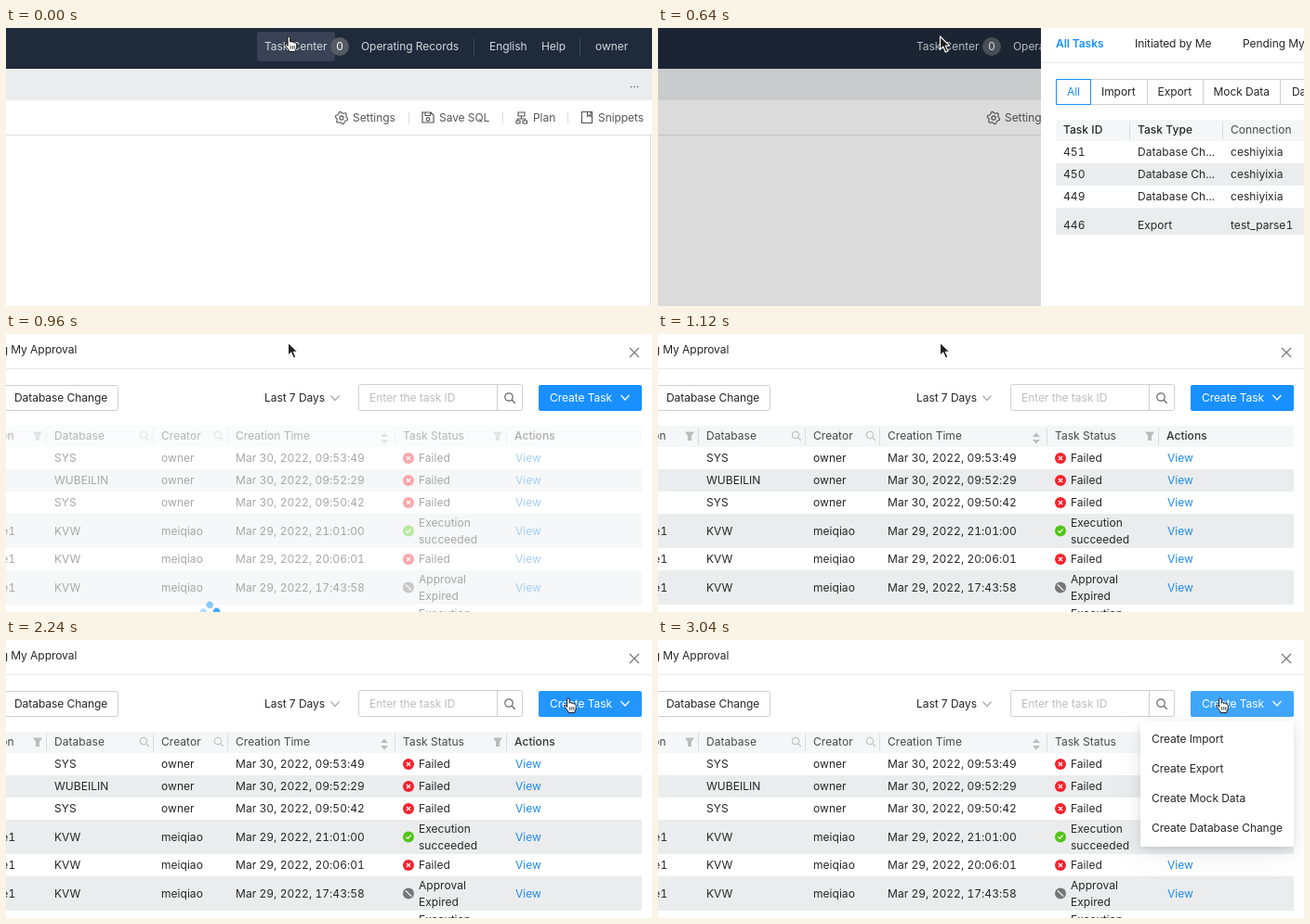
Animation, 695 px wide and 300 px high, one loop 3.2 s. Source, as an HTML page:

```html
<!DOCTYPE html>
<html lang="en">
<head>
<meta charset="utf-8">
<title>Task center</title>
<style>
html, body { margin: 0; width: 100%; height: 100%; overflow: hidden; background: #fff }
svg { display: block; font: 12px Inter, "Noto Sans", sans-serif; letter-spacing: -.06px; white-space: pre }
#table { font-variant-numeric: tabular-nums; letter-spacing: .04px }
#menu rect { filter: drop-shadow(0 2px 3px #0001) drop-shadow(0 5px 8px #0001) drop-shadow(0 8px 16px #0000000d) }
</style>
</head>
<body>
<svg id="stage" width="695" height="300" viewBox="0 0 695 300">
  <defs><clipPath id="cut"><rect id="cutBox" width="1000" height="300"/></clipPath></defs>
  <g id="page"></g>
  <rect id="mask" width="695" height="300" opacity=".14"/>
  <g id="drawer">
    <rect width="1000" height="300" fill="#fff"/>
    <g id="bar"></g>
    <g clip-path="url(#cut)"><g id="table"></g></g>
    <g id="spin" fill="#1890ff"></g>
  </g>
  <g id="menu"></g>
  <path id="arrow" d="M0 0V14.2L3.3 11.2L5.8 17L8.4 15.9L5.9 10.2H10.2Z" fill="#222" stroke="#fff" stroke-width="1.1" stroke-linejoin="round"/>
  <g id="hand" stroke="#111" stroke-linejoin="round" stroke-linecap="round">
    <path d="M3.6 10V2.2C3.6 .2 6.2 .2 6.2 2.2V6.2C6.6 5 8.5 5.2 8.6 6.5C9.2 5.6 10.8 6 10.9 7.2C11.6 6.6 13.2 7 13.2 8.4V11.5C13.2 13.5 12 14 11.8 16.4H5.2C4.9 14 2.3 12.4 1 9.8C.2 8.2 1.8 7.2 2.8 8.8Z" fill="#fff"/>
    <path d="M6.7 10.5V13.3M8.8 10.5V13.3M10.8 10.5V13.3" stroke-width=".8"/>
  </g>
</svg>
<script>
const $ = id => document.getElementById(id);
const text = (x, y, s, fill = '#262626', more = '') =>
  `<text x="${x}" y="${y + 4.3}" fill="${fill}" ${more}>${s}</text>`;
const rect = (x, y, w, h, fill, more = '') =>
  `<rect x="${x}" y="${y}" width="${w}" height="${h}" fill="${fill}" ${more}/>`;
const line = (d, color, width = 1, more = '') =>
  `<path d="${d}" fill="none" stroke="${color}" stroke-width="${width}" ${more}/>`;
const dot = (x, y, r, fill) => `<circle cx="${x}" cy="${y}" r="${r}" fill="${fill}"/>`;
const lens = (x, y, r, color) =>
  line(`M${x - r} ${y}a${r} ${r} 0 1 1 ${2 * r} 0a${r} ${r} 0 1 1 ${-2 * r} 0M${x + r * .7} ${y + r * .7}l${r * .9} ${r * .9}`, color, r / 3.4);
const chevron = (x, y, color) => line(`M${x - 4.5} ${y - 2.5}l4.5 5l4.5 -5`, color, 1.2);
const bold = 'font-weight="500"';

function drawPage() {
  const pale = '#d5d8dd', ink = '#555';
  let s = rect(0, 0, 695, 44, '#1f2a3b') + rect(0, 44, 695, 34, '#ebecee');
  s += rect(270, 4, 84, 32, '#3a4256', 'rx="3" id="hover"') + dot(359, 20, 10, '#565b64');
  for (const [x, label] of [[278, 'Task Center'], [382, 'Operating Records'], [520, 'English'], [576, 'Help'], [634, 'owner']])
    s += text(x, 20, label, pale);
  s += text(355.3, 20, '0', '#fff');
  s += line('M503.5 11V30M617.5 11V30', '#3c4657');
  for (const x of [672.5, 676, 679.5]) s += dot(x, 63.5, .8, '#666');
  for (const [x, label] of [[373, 'Settings'], [466, 'Save SQL'], [567, 'Plan'], [637, 'Snippets']])
    s += text(x, 97, label, ink);
  s += line('M433.5 91V103M534.5 91V103M604.5 91V103', '#ddd');
  s += line('M0 115.5H695M693.5 116V300', '#dedede');
  // gear
  let gear = '';
  for (let i = 0; i < 24; i++) {
    const a = (i + .5) * Math.PI / 12, r = i % 4 < 2 ? 6.7 : 5.2;
    gear += `${i ? 'L' : 'M'}${361 + r * Math.cos(a)} ${97 + r * Math.sin(a)}`;
  }
  s += line(gear + 'ZM358.9 97a2.1 2.1 0 1 0 4.2 0a2.1 2.1 0 1 0 -4.2 0', ink, 1.1, 'stroke-linejoin="round"');
  s += line('M448 91H457L460 94V102H448ZM451 91V94.5H456.5V91M452.2 98.5a1.8 1.8 0 1 0 3.6 0a1.8 1.8 0 1 0 -3.6 0', ink, 1.2);
  s += line('M551 91H558V95H551ZM554.5 95V98M550.5 100V98H558.5V100M549 100H553V103H549ZM556 100H560.5V103H556Z', ink, 1.1);
  s += line('M619.5 90.5H630.5V102.5H619.5ZM625.5 90.5V95.5L627.5 94L629 95.5V90.5', ink, 1.1);
  return s;
}

function drawBar() {
  const edge = '#cfcfcf';
  let s = text(16, 17, 'All Tasks', '#1890ff', 'font-weight="600"') + text(101, 17, 'Initiated by Me') +
    text(217, 17, 'Pending My Approval') + line('M0 37.5H1000', '#e8e8e8');
  s += rect(16.5, 55.5, 365, 27, '#fff', `stroke="${edge}" rx="2"`);
  s += line('M114.5 55V83M174.5 55V83M257.5 55V83', edge);
  s += rect(16.5, 55.5, 37, 27, '#fff', 'stroke="#1890ff"');
  s += text(28, 69, 'All', '#1890ff');
  for (const [x, label] of [[65, 'Import'], [125.5, 'Export'], [185.5, 'Mock Data'], [270, 'Database Change'], [539, 'Last 7 Days']])
    s += text(x, 69, label);
  s += chevron(615, 69, '#aaa');
  s += rect(640.5, 54.5, 176, 28, '#fff', `stroke="${edge}" rx="2"`) + line('M789.5 55V82', edge);
  s += text(652, 69, 'Enter the task ID', '#bdbdbd') + lens(802, 68, 4.2, '#666');
  s += rect(830, 51, 119, 36, '#1890ff', 'rx="5" opacity=".13" id="wave"');
  s += rect(834, 55, 111, 28, '#1890ff', 'rx="2" id="button"');
  s += text(846, 69, 'Create Task', '#fff') + chevron(927, 68.5, '#fff');
  return s + line('M932 15l10 10M942 15l-10 10', '#777', 1.2);
}

const status = {
  Failed: ['#f5222d', 'M-2 -2L2 2M2 -2L-2 2'],
  'Execution succeeded': ['#52c41a', 'M-2.5 0L-.7 1.9L2.6 -1.8'],
  'Approval Expired': ['#777', 'M-3.2 -3.2L3.2 3.2']
};
const rows = [
  [122, 24, 451, 'Database Ch...', 'ceshiyixia', 'SYS', 'owner', '30, 2022, 09:53:49', 'Failed'],
  [146, 24, 450, 'Database Ch...', 'ceshiyixia', 'WUBEILIN', 'owner', '30, 2022, 09:52:29', 'Failed'],
  [170, 24, 449, 'Database Ch...', 'ceshiyixia', 'SYS', 'owner', '30, 2022, 09:50:42', 'Failed'],
  [194, 37, 446, 'Export', 'test_parse1', 'KVW', 'meiqiao', '29, 2022, 21:01:00', 'Execution succeeded'],
  [231, 24, 445, 'Export', 'test_parse1', 'KVW', 'meiqiao', '29, 2022, 20:06:01', 'Failed'],
  [255, 37, 444, 'Export', 'test_parse1', 'KVW', 'meiqiao', '29, 2022, 17:43:58', 'Approval Expired'],
  [292, 37, 443, 'Export', 'test_parse1', 'KVW', 'meiqiao', '29, 2022, 17:40:12', 'Execution succeeded']
];

function drawTable() {
  const columns = [24, 104, 204, 313, 428, 508];
  const grey = '#bcbcbc';
  let s = rect(16, 99, 929, 23, '#f5f6f8');
  ['Task ID', 'Task Type', 'Connection', 'Database', 'Creator', 'Creation Time'].forEach((label, i) =>
    s += text(columns[i], 110, label, i < 2 ? '#262626' : '#484848', i < 2 ? bold : ''));
  s += text(688, 110, 'Task Status', '#484848') + text(808, 110, 'Actions', '#333', bold);
  for (const x of [95.5, 195.5, 304.5, 419.5, 499.5, 679.5, 799.5]) s += line(`M${x} 101V120`, '#dcdcdc');
  for (const x of [295, 790]) s += `<path d="M${x - 5} 105.5H${x + 5}L${x + 2} 110V115H${x - 2}V110Z" fill="${grey}"/>`;
  s += lens(409, 109, 3.7, grey) + lens(489, 109, 3.7, grey);
  s += `<path d="M664 111L668 106.500L672 111ZM664 114L668 118.500L672 114Z" fill="${grey}"/>`;

  rows.forEach(([y, h, id, type, link, base, user, date, state], i) => {
    const mid = y + h / 2, [color, mark] = status[state];
    s += rect(16, y, 929, h, i % 2 ? '#ebecee' : '#fff');
    [id, type, link, base, user, 'Mar ' + date].forEach((v, k) => s += text(columns[k], mid, v));
    s += dot(694, mid, 6, color) + line(mark, '#fff', 1.2, `transform="translate(694 ${mid})"`);
    const words = state.split(' ');
    words.forEach((w, k) => s += text(705, mid + (k * 2 - words.length + 1) * 9, w));
    s += text(809, mid, 'View', '#1f8be8');
  });
  return s;
}

$('page').innerHTML = drawPage();
$('bar').innerHTML = drawBar();
$('table').innerHTML = drawTable();
$('spin').innerHTML = [[-5, -5, .5], [5, -5, .8], [5, 5, .5], [-5, 5, .3]]
  .map(([x, y, o]) => `<circle cx="${x}" cy="${y}" r="3.6" opacity="${o}"/>`).join('');
$('menu').innerHTML = rect(519, 87, 165, 136, '#fff', 'rx="2"') +
  ['Import', 'Export', 'Mock Data', 'Database Change'].map((v, i) => text(531, 107 + 32 * i, 'Create ' + v)).join('');

const show = (id, on) => $(id).style.display = on ? '' : 'none';
const move = (id, x, y, more = '') => $(id).setAttribute('transform', `translate(${x} ${y}) ${more}`);
const mix = (a, b, k) => a.map((v, i) => Math.round(v + (b[i] - v) * k));

function draw(now) {
  // the screen refreshes in steps of 160 ms
  const step = Math.floor(now % 3200 / 160);
  const open = step >= 4, loading = step === 5 || step === 6, unfolding = step === 15;

  show('hover', !open);
  show('mask', open);
  show('drawer', open);
  move('drawer', Math.round(673 * .0267 ** (step - 4)) - 261, 0);
  $('cutBox').setAttribute('height', step === 4 ? 223 : 300);
  $('table').setAttribute('opacity', loading ? .4 : 1);
  show('spin', loading);
  move('spin', 480.5, 299.5, `rotate(${54 * (step - 5) - 11})`);

  const glow = Math.min(1, Math.max(0, (step - 12) / 7));
  $('button').setAttribute('fill', `rgb(${mix([24, 144, 255], [64, 166, 252], glow)})`);
  show('wave', unfolding);
  show('menu', step >= 15);
  $('menu').setAttribute('opacity', unfolding ? .95 : 1);
  move('menu', 0, 87, `scale(1 ${unfolding ? .992 : 1}) translate(0 -87)`);

  const pointing = step === 0 || step >= 13;
  show('hand', pointing);
  show('arrow', !pointing);
  move('hand', ...(step ? [600, 62] : [299.5, 9]));
  move('arrow', ...(step < 11 ? [303.5, 9] : step === 11 ? [608.5, 45] : [609.5, 48.5]));
}

const start = performance.now();
(function tick() {
  draw(performance.now() - start);
  requestAnimationFrame(tick);
})();
</script>
</body>
</html>
```
